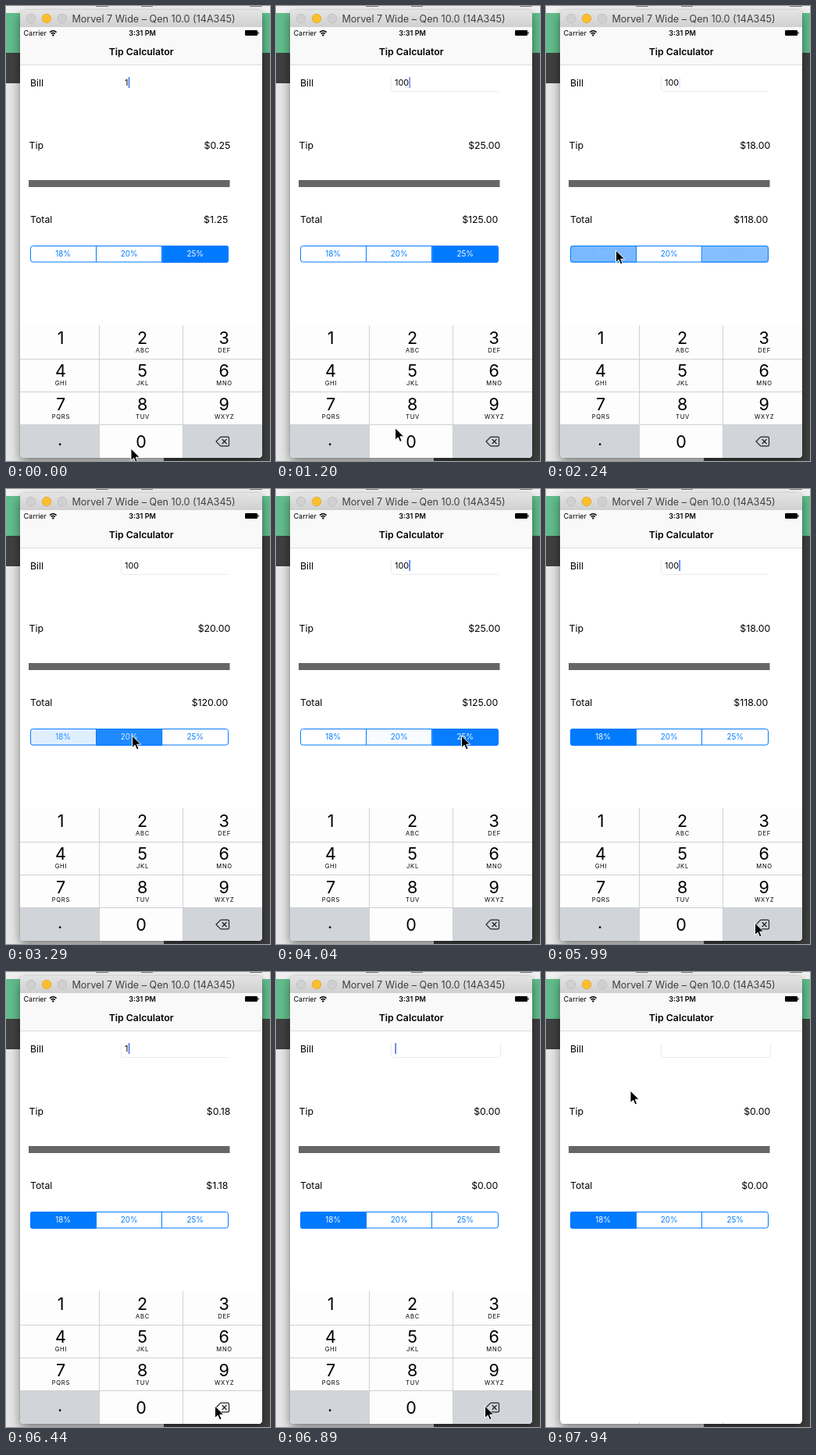
Animation, 338 px wide and 583 px high, one loop 8000 ms. Source, as an HTML page:

```html
<!DOCTYPE html>
<html lang="en">
<head>
<meta charset="utf-8">
<title>Tip Calculator</title>
<style>
  html, body { margin: 0; width: 100%; height: 100%; overflow: hidden; background: #e6e6e6; }
  #stage { position: relative; width: 338px; height: 583px; overflow: hidden; }
  #stage > * { position: absolute; }
  .window {
    left: 18px; top: 5px; width: 310px; height: 574px;
    border-radius: 5px; background: #fff;
    box-shadow: 0 6px 14px rgba(0, 0, 0, .45), 0 0 1px rgba(0, 0, 0, .5);
  }
  svg { left: 0; top: 0; display: block; }
  text { font-family: Inter, Roboto, sans-serif; font-size: 12.3px; fill: #000; }
  .mid { text-anchor: middle; }
  .end { text-anchor: end; }
  .small { font-size: 9px; }
  .bold { font-weight: 600; }
  .title { font-size: 12.6px; fill: #404040; }
  .entry { font-size: 10.8px; }
  .seg { font-size: 9.8px; }
  .digit { font-size: 21.5px; }
  .letters { font-size: 7.6px; letter-spacing: .7px; }
  .grid { stroke: #d0d1d4; fill: none; }
</style>
</head>
<body>
<div id="stage">
  <svg width="338" height="583">
    <rect width="338" height="583" fill="#e6e6e6"/>
    <rect width="338" height="9" fill="#f1f1f1"/>
    <path d="M115 .5h16M173 .5h15M312 .5h16" stroke="#777"/>
    <rect y="9" width="338" height="51" fill="#62bd8c"/>
    <rect y="60" width="338" height="39" fill="#404040"/>
    <rect x="202" y="99" width="136" height="484" fill="#404040"/>
  </svg>
  <div class="window"></div>
  <svg width="338" height="583">
    <defs>
      <linearGradient id="bar" x2="0" y2="1">
        <stop stop-color="#e4e4e4"/><stop offset="1" stop-color="#d0d0d0"/>
      </linearGradient>
      <clipPath id="screen"><path d="M18 27H328V574q0 5-5 5H23q-5 0-5-5z"/></clipPath>
      <clipPath id="control"><rect x="31" y="307" width="254" height="22" rx="3"/></clipPath>
    </defs>

    <path d="M18 27V10q0-5 5-5H323q5 0 5 5V27z" fill="url(#bar)"/>
    <g stroke-width=".7">
      <circle cx="32" cy="16" r="5.8" fill="#d0d0d0" stroke="#b8b8b8"/>
      <circle cx="52" cy="16" r="5.8" fill="#fbbf2d" stroke="#dea123"/>
      <circle cx="72" cy="16" r="5.8" fill="#d0d0d0" stroke="#b8b8b8"/>
    </g>
    <text class="title mid" x="189" y="20.8">Morvel 7 Wide – Qen 10.0 (14A345)</text>

    <rect x="18" y="27" width="310" height="48" fill="#f9f9f9"/>
    <path d="M18 75.5H328" stroke="#dcdcdc"/>
    <text class="small" x="22.5" y="38">Carrier</text>
    <g fill="none" stroke="#000" stroke-width="1.4">
      <path d="M56 33.6q4.3-3.6 8.6 0M57.7 35.6q2.6-2.2 5.2 0"/>
      <circle cx="60.3" cy="37.4" r=".5"/>
    </g>
    <text class="small bold mid" x="174.5" y="38">3:31 PM</text>
    <rect x="306" y="31" width="16" height="7" rx="1.2"/>
    <path d="M323 33v3" stroke="#000"/>
    <text class="bold mid" x="173.2" y="63">Tip Calculator</text>

    <path id="field" fill="none" stroke="#ececec"/>
    <text x="31" y="103.3">Bill</text>
    <text id="bill" class="entry" x="152" y="102"></text>
    <rect id="caret" y="91" width="1.5" height="14" fill="#426bf2"/>
    <text x="29.5" y="183">Tip</text>
    <text id="tip" class="end" x="287.3" y="183"></text>
    <rect x="29" y="223" width="257.500" height="9" fill="#666"/>
    <text x="31" y="278">Total</text>
    <text id="total" class="end" x="284.3" y="278"></text>

    <g id="segs" clip-path="url(#control)"></g>
    <rect x="31.500" y="307.500" width="253" height="20.500" rx="3" fill="none" stroke="#007aff"/>
    <path d="M115.500 307v21M199.500 307v21" stroke="#007aff"/>

    <g clip-path="url(#screen)"><g id="pad"></g></g>

    <path id="mouse" d="M0 0V15.6L3.6 12.2 6 17.8 8.6 16.7 6.2 11.2H11.2Z"
      stroke="#fff" stroke-width="1" stroke-linejoin="round"/>
  </svg>
</div>
<script>
const LOOP = 8000, STEP = 150;
const RESYNC = 2240;   // the refresh grid restarts here
const BLUR = 7490;     // the field loses focus; the keypad leaves three steps later
const RATES = [0.18, 0.20, 0.25];

// [time, key or segment index]
const TAPS = [
  [150, '0'], [450, '0'],
  [2162, 0], [3158, 1], [3894, 2], [4700, 0],
  [6140, '<'], [6440, '<'], [6740, '<']
];

// [start, end, x, y]: eased pointer moves
const MOVES = [
  [0, 1, 160, 567],
  [1050, 1800, 89.5, 313],
  [2540, 2990, 161.5, 316],
  [3440, 3890, 237.5, 316],
  [4340, 4790, 90, 316],
  [4850, 5690, 267.5, 556],
  [6890, 7490, 108, 152]
];

const $ = id => document.getElementById(id);
const clamp = v => Math.max(0, Math.min(1, v));
const ease = k => k * k * (3 - 2 * k);
const money = v => '$' + v.toFixed(2);

function refreshTime(t) {
  const start = t < RESYNC ? 0 : RESYNC;
  return start + Math.floor((t - start) / STEP) * STEP;
}

function mouseAt(t) {
  let [, , x, y] = MOVES[0];
  for (const [start, end, toX, toY] of MOVES) {
    const k = ease(clamp((t - start) / (end - start)));
    x += (toX - x) * k;
    y += (toY - y) * k;
  }
  return [x, y];
}

// Replay all taps up to time t
function stateAt(t) {
  const s = { bill: '1', pick: 2, last: 2, fade: 1, held: '', idle: Infinity };
  for (const [time, what] of TAPS) {
    const age = t - time;
    if (age < 0) break;
    if (typeof what === 'number') {
      s.last = s.pick;
      s.pick = what;
      s.fade = clamp(age / STEP);
    } else {
      s.bill = what === '<' ? s.bill.slice(0, -1) : s.bill + what;
      s.held = age < STEP ? what : '';
      s.idle = age;
    }
  }
  return s;
}

function caretAlpha(t, idle) {
  if (t >= BLUR) return 0;
  if (idle < 700) return 1;
  const phase = t % 1000;
  return clamp((phase < 500 ? 250 - phase : phase - 500) / 60);
}

function buildSegments() {
  $('segs').innerHTML = RATES.map((rate, i) => {
    const x = 31 + i * 84.6;
    return `<rect x="${x}" y="307" width="84.6" height="22" fill="#007aff"/>
      <text class="seg mid" x="${x + 42.1}" y="321.3">${rate * 100}%</text>`;
  }).join('');
}

function buildPad() {
  const letters = ['', 'ABC', 'DEF', 'GHI', 'JKL', 'MNO', 'PQRS', 'TUV', 'WXYZ'];
  const keys = letters.map((label, i) => {
    const x = 70 + i % 3 * 104.6, y = 433 + Math.floor(i / 3) * 42.3;
    return `<text class="digit mid" x="${x}" y="${y}">${i + 1}</text>
      <text class="letters mid" x="${x + .4}" y="${y + 11}">${label}</text>`;
  }).join('');
  $('pad').innerHTML = `
    <rect x="18" y="409" width="310" height="170" fill="#fdfdfd"/>
    <rect x="18" y="537" width="102" height="42" fill="#d1d5da"/>
    <rect id="zero" x="120" y="537" width="106.5" height="42"/>
    <rect id="back" x="226.5" y="537" width="101.5" height="42"/>
    <path class="grid" d="M119.5 409V579M226.5 409V579M18 452.5H328M18 494.5H328M18 536.5H328"/>
    ${keys}
    <text class="digit mid" x="69" y="563">.</text>
    <text class="digit mid" x="173" y="565.5">0</text>
    <path d="M269 558l5-5.2q.7-.7 1.6-.7h8.2q1.7 0 1.7 1.7v8.4q0 1.7-1.7 1.7h-8.2q-.9 0-1.6-.7zM276.7 555l5.8 6m0-6l-5.8 6"
      fill="none" stroke="#222" stroke-width="1.2" stroke-linejoin="round"/>`;
}

function paint(t) {
  const { bill, pick, last, fade, held, idle } = stateAt(t);
  const tip = Number(bill) * RATES[pick];

  $('bill').textContent = bill;
  $('tip').textContent = money(tip);
  $('total').textContent = money(Number(bill) + tip);
  $('field').setAttribute('d', t < STEP ? '' : 'M147.5 91V106q0 3.5 3.5 3.5H' +
    (bill ? '285' : '284q3.5 0 3.5-3.5V91'));
  $('caret').setAttribute('x', 152.4 + (bill && $('bill').getComputedTextLength()));
  $('caret').setAttribute('opacity', caretAlpha(t, idle));

  RATES.forEach((_, i) => {
    const level = i === pick ? fade : i === last ? 1 - fade : 0;
    const box = $('segs').children[i * 2];
    box.setAttribute('opacity', level);
    box.nextElementSibling.style.fill = `rgb(${255 * level}, ${122 + 133 * level}, 255)`;
  });

  $('zero').setAttribute('fill', held === '0' ? '#d1d5da' : '#fdfdfd');
  $('back').setAttribute('fill', held === '<' ? '#fdfdfd' : '#d1d5da');
  $('pad').setAttribute('transform', `translate(0 ${t < BLUR + 3 * STEP ? 0 : 168})`);
  $('mouse').setAttribute('transform', `translate(${mouseAt(t)})`);
}

function tick() {
  paint(refreshTime(performance.now() % LOOP));
  requestAnimationFrame(tick);
}

buildSegments();
buildPad();
tick();
</script>
</body>
</html>
```
